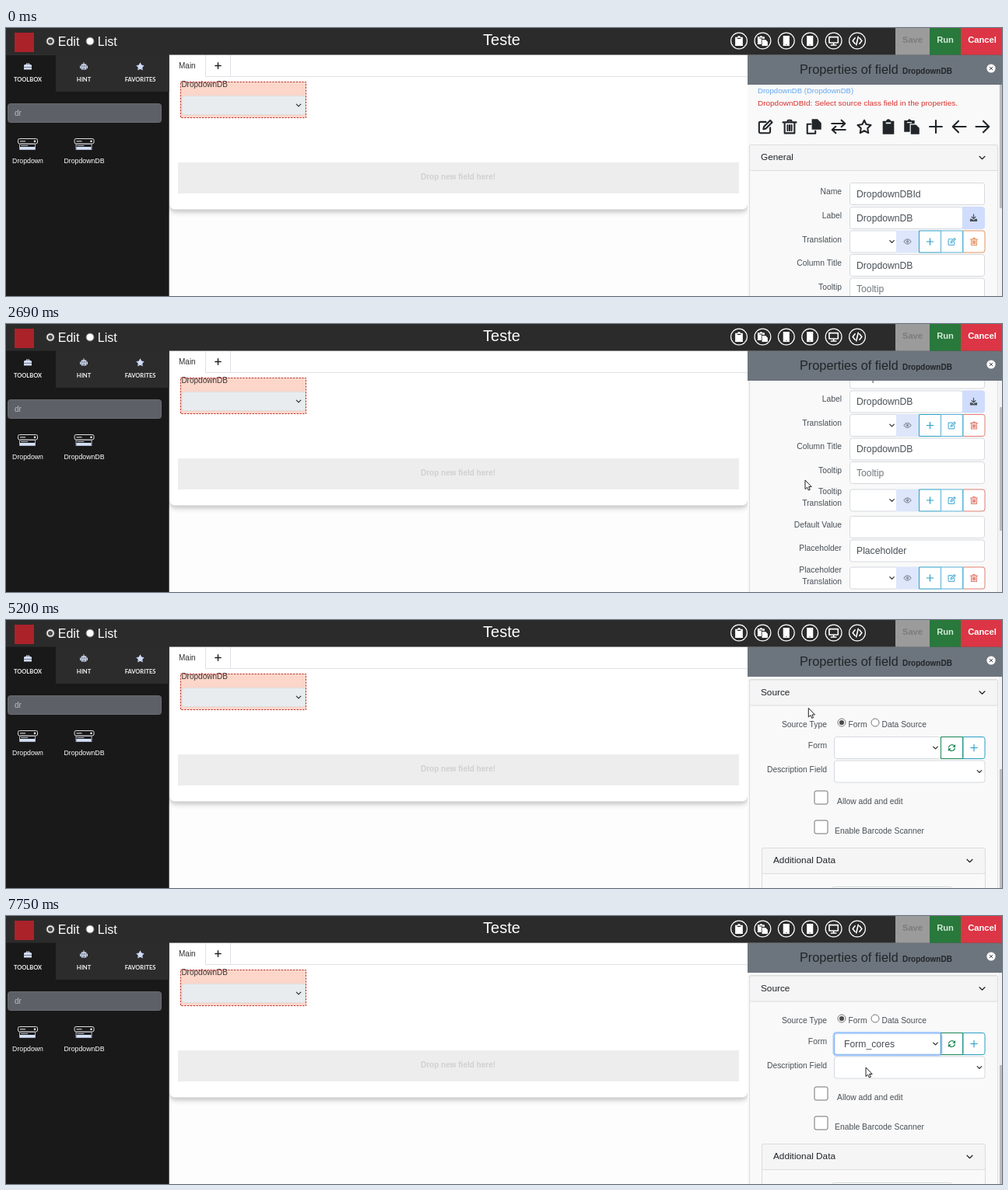
Write an HTML page with a canvas that moves like this. It is 1280x345 px and loops after 8 s.

```html
<!DOCTYPE html>
<html lang="en">
<head>
<meta charset="utf-8">
<style>
html, body { margin: 0; width: 100%; height: 100%; overflow: hidden; background: #fff }
canvas { display: block }
</style>
</head>
<body>
<canvas id="stage" width="1280" height="345"></canvas>
<script>
const ctx = document.getElementById('stage').getContext('2d');
const DARK = '#212529', GREY = '#495057', LINE = '#d5d9de', BLUE = '#2b9fc4';

// Icons on a 16 unit grid: stroked part, filled part
const icons = {
  edit: ['M8.5 3H2.5Q1.3 3 1.3 4.2V13.5Q1.3 14.7 2.5 14.7H11.8Q13 14.7 13 13.5V9M5.8 10.6L6.4 8L13 1.4L15 3.4L8.4 10Z'],
  trash: ['M1 3.4H15M5.3 3.4L6.4 1.2H9.6L10.7 3.4M2.8 3.4V14.9H13.2V3.4M5.9 6.3V12.2M8 6.3V12.2M10.1 6.3V12.2'],
  copy: ['M5 5.3H1.2V15.2H9.8V12.5', 'M6 0H12L16 4V11H6Z'],
  swap: ['M0.8 4.7H14.5M11 1.2L14.8 4.7L11 8.2M15.2 11.3H1.5M5 7.8L1.2 11.3L5 14.8'],
  star: ['M8 1.2L10.1 5.6L15 6.3L11.5 9.7L12.3 14.6L8 12.3L3.7 14.6L4.5 9.7L1 6.3L5.9 5.6Z'],
  clip: ['', 'M2 2H5.2Q8 -2 10.8 2H14V16H2ZM5.3 3.4H10.7V5H5.3Z'],
  paste: ['', 'M0 1.5H3.5Q5.5 -1.5 7.5 1.5H11V5H6V13.5H0ZM3 3H8V4.2H3ZM7 6H12.5L16 9.5V16H7Z'],
  plus: ['M8 1.5V14.5M1.5 8H14.5'],
  left: ['M15 8H1.5M7.2 2L1.2 8L7.2 14'],
  right: ['M1 8H14.5M8.8 2L14.8 8L8.8 14'],
  move: ['M8 1V15M1 8H15M5.8 3L8 1L10.2 3M5.8 13L8 15L10.2 13M3 5.8L1 8L3 10.2M13 5.8L15 8L13 10.2'],
  down: ['M2.5 5.3L8 10.7L13.5 5.3'],
  eye: ['M1 8Q8 -1.5 15 8Q8 17.5 1 8Z', 'M5.3 8A2.7 2.7 0 1 0 10.7 8A2.7 2.7 0 1 0 5.3 8Z'],
  download: ['M8 1V9M4.3 5.8L8 9.5L11.7 5.8', 'M1 10H5L8 12.5L11 10H15V15H1Z'],
  refresh: ['M2 7A6.2 6.2 0 0 1 13 4.5M14 9A6.2 6.2 0 0 1 3 11.5', 'M15 1V6.8H9.2ZM1 15V9.2H6.8Z'],
  toolbox: ['', 'M4.5 4V1.5H11.5V4H14.5L16 6V9H0V6L1.5 4ZM6 3V4H10V3ZM0 10H16V14.5H0Z'],
  robot: ['', 'M7 0H9V3H13.2V14.5H2.8V3H7ZM5 6V8.5H7V6ZM9 6V8.5H11V6ZM5 11V12.5H11V11ZM0 6.5H2V12H0ZM14 6.5H16V12H14Z'],
  device: ['', 'M3 0H13V16H3ZM7.2 13.4V14.6H8.8V13.4Z'],
  monitor: ['M1 2H15V11H1ZM8 11V14.5M4 14.7H12'],
  code: ['M4.5 3.5L0.8 8L4.5 12.5M11.5 3.5L15.2 8L11.5 12.5M9.5 1.5L6.5 14.5'],
  cross: ['M3 3L13 13M13 3L3 13']
};
for (const key in icons) icons[key] = icons[key].map(d => new Path2D(d));
const arrow = new Path2D('M0 0V11.5L2.7 9.2L4.4 13L6.3 12.2L4.6 8.5H8.2Z');

function icon(name, x, y, size, color = DARK, weight = 1.7) {
  const [line, solid] = icons[name];
  ctx.save();
  ctx.translate(x - size / 2, y - size / 2);
  ctx.scale(size / 16, size / 16);
  ctx.strokeStyle = ctx.fillStyle = color;
  ctx.lineWidth = weight;
  ctx.lineJoin = ctx.lineCap = 'round';
  ctx.stroke(line);
  if (solid) ctx.fill(solid, 'evenodd');
  ctx.restore();
}

function text(str, x, y, size, color = GREY, align = 'left', weight = 400, font = '"Liberation Sans", Arial') {
  ctx.font = `${weight} ${size}px ${font}, sans-serif`;
  ctx.fillStyle = color;
  ctx.textAlign = align;
  ctx.fillText(str, x, y);
}

function rect(x, y, w, h, color) {
  ctx.fillStyle = color;
  ctx.fillRect(x, y, w, h);
}

function box(x, y, right, bottom, fill = '#fff', stroke = LINE, radius = 3) {
  ctx.beginPath();
  ctx.roundRect(x + .5, y + .5, right - x - 1, bottom - y - 1, radius);
  ctx.lineWidth = 1;
  if (fill) { ctx.fillStyle = fill; ctx.fill(); }
  if (stroke) { ctx.strokeStyle = stroke; ctx.stroke(); }
}

function disc(x, y, r, fill, stroke, width = 1) {
  ctx.beginPath();
  ctx.arc(x, y, r, 0, 7);
  if (fill) { ctx.fillStyle = fill; ctx.fill(); }
  if (stroke) { ctx.strokeStyle = stroke; ctx.lineWidth = width; ctx.stroke(); }
}

function radio(x, y, on) {
  disc(x, y, 5, '#fff', '#767676');
  if (on) disc(x, y, 3.1, '#4c4c4c');
}

// Value of a list of [time, ...numbers] keys at time t
function at(keys, t, ease = u => u) {
  const i = keys.findIndex(k => k[0] > t);
  if (i < 0) return keys.at(-1).slice(1);
  if (!i) return keys[0].slice(1);
  const a = keys[i - 1], b = keys[i], u = ease((t - a[0]) / (b[0] - a[0]));
  return a.slice(1).map((v, j) => v + (b[j + 1] - v) * u);
}
const smooth = u => u * u * (3 - 2 * u);

const pointerKeys = [
  [190, 1030, 306], [930, 331, 97], [1060, 327, 94], [1260, 327, 94], [2000, 1000, 193], [2210, 1027, 201],
  [4110, 1027, 201], [4480, 1050, 138], [4860, 1009, 95], [4930, 1009, 95], [5680, 1084, 157],
  [6000, 1104, 164], [6450, 1104, 164], [7150, 1100, 188], [7500, 1100, 188], [7550, 1104, 190],
  [7700, 1104, 190], [7750, 1105, 195]
];
const scrollKeys = [
  [2409, 0], [2410, 5], [2560, 70], [3040, 343], [3190, 412], [3260, 418],
  [3640, 418], [3650, 432], [3715, 478], [3780, 504]
];
const OPEN = 5950, PICK = 7750;
const options = ['Form_cores', 'FormularioTeste', 'Role', 'SubscribeTopic', 'Teste', 'Topic', 'User', 'UserRole', 'UserToken'];
const tools = ['edit', 'trash', 'copy', 'swap', 'star', 'clip', 'paste', 'plus', 'left', 'right'];

function topBar() {
  rect(0, 0, 1280, 34.5, '#2b2b2b');
  rect(11, 6, 25, 25, '#ab2229');
  radio(57, 17, true);
  text('Edit', 66.8, 23.4, 16, '#fff');
  radio(108, 17);
  text('List', 117.8, 23.4, 16, '#fff');
  text('Teste', 637, 21.6, 20, '#fff', 'center');
  ['clip', 'paste', 'device', 'device', 'monitor', 'code'].forEach((name, i) => {
    const x = 942 + i * 30.4;
    disc(x, 16.5, 10.4, null, '#fff', 1.2);
    icon(name, x, 16.5, 13, '#fff', 2);
  });
  rect(1143, 0, 44, 34.5, '#9b9b9b');
  rect(1187, 0, 40, 34.5, '#28793b');
  rect(1227, 0, 53, 34.5, '#dc3545');
  text('Save', 1165, 19.4, 11.2, '#7c7c7c', 'center', 700);
  text('Run', 1207, 19.4, 11.2, '#d3ead8', 'center', 700);
  text('Cancel', 1254.5, 19.4, 11.2, '#fff', 'center', 700);
}

function sidebar() {
  rect(0, 34.5, 209.5, 311, '#191919');
  rect(64, 34.5, 145.5, 47.5, '#2c2c2c');
  [['toolbox', 'TOOLBOX', 28], ['robot', 'HINT', 100], ['star', 'FAVORITES', 172.5]].forEach(([name, label, x]) => {
    icon(name, x, 49.5, 10, '#d3defb');
    if (name == 'star') disc(x, 49.7, 2.8, '#d3defb');
    text(label, x, 69, 7.5, '#f1f1f1', 'center', 700, 'Lato');
  });
  box(2, 97, 200, 122, '#5d6167', '#676b70');
  text('dr', 11, 113, 10, '#b9bdc2');
  [['Dropdown', 28], ['DropdownDB', 100.5]].forEach(([label, x]) => {
    box(x - 13, 142, x + 13, 149.5, '#191919', '#dedede', 2);
    rect(x - 10, 145, 7, 1.5, '#aaa');
    disc(x + 9, 145.8, 1.2, '#fff');
    box(x - 11, 149, x + 10, 157, '#191919', '#aeb4c2', 0);
    rect(x - 9, 151, 9, 1, '#bbb');
    rect(x - 10, 153, 19, 3, '#d5dff8');
    text(label, x, 174, 8.75, '#fff', 'center');
  });
}

function editor(hover) {
  rect(209.5, 34.5, 744, 311, '#fdfdfd');
  ctx.save();
  ctx.shadowColor = 'rgba(0,0,0,.26)';
  ctx.shadowBlur = 7;
  ctx.shadowOffsetY = 3;
  ctx.beginPath();
  ctx.roundRect(210, 34.5, 743, 199, [0, 0, 7, 7]);
  ctx.fillStyle = '#fff';
  ctx.fill();
  ctx.restore();
  rect(256, 62, 697, 1, '#dee2e6');
  rect(256, 35, 1, 27, '#dee2e6');
  rect(288, 35, 1, 27, '#dee2e6');
  text('Main', 222, 52, 10, '#333');
  icon('plus', 272.5, 48.5, 9, DARK, 2.6);

  rect(224, 69, 161.5, 46.5, '#fbd6c9');
  text('DropdownDB', 225.4, 76.4, 10, '#3b3535');
  box(226, 87, 385, 112, '#e9ecef', '#dcdfe3');
  icon('down', 376, 99.5, 8, '#333', 2.6);
  ctx.setLineDash([2.3, 1.5]);
  ctx.strokeStyle = '#bb3030';
  ctx.lineWidth = 1;
  ctx.strokeRect(224.5, 69.5, 161, 46);
  ctx.setLineDash([]);

  rect(221, 173, 721, 40, '#ededed');
  text('Drop new field here!', 581, 195, 10, '#d0d0d0', 'center', 700);

  if (hover) {
    ctx.save();
    ctx.beginPath();
    ctx.rect(349, 69, 22, 158);
    ctx.clip();
    rect(349, 69, 22, 158, '#dbf0fd');
    ['move', ...tools.slice(0, 7)].forEach((name, i) => icon(name, 360, 80.2 + i * 21.7, 13));
    ctx.restore();
  }
}

function label(str, right, y) { text(str, right, y + 15, 10.35, GREY, 'right'); }

function input(str, y, color = GREY, right = 1258) {
  box(1084, y, right, y + 29);
  text(str, 1093, y + 18.6, 12.2, color);
}

function select(x, y, right) {
  box(x, y, right, y + 29);
  icon('down', right - 7.5, y + 14.5, 8, '#333', 2.6);
}

// Corners are round only on the last button of a group
function button(name, x, y, color, fill = '#fff', edge = color) {
  const end = x > 1225 ? 3 : 0;
  box(x, y, x + 29, y + 29, fill, edge, [0, end, end, 0]);
  icon(name, x + 14.5, y + 14.5, 10.5, color, 1.8);
}

function translation(y, bin) {
  select(1084, y, 1146);
  button('eye', 1144, y, '#8993a3', '#dde6fa', '#dde6fa');
  button('plus', 1173, y, BLUE);
  button('trash', 1229.5, y, bin);
  button('edit', 1201, y, '#58b2d8');
}

function header(str, x, y, right) {
  box(x, y, right, y + 34, '#f5f5f6', '#dcdcdd', 2);
  text(str, x + 15, y + 20, 11.8, DARK);
  icon('down', right - 20.5, y + 17, 10, DARK, 2);
}

function checkbox(x, y, str, textX) {
  box(x, y, x + 18, y + 18, '#fff', '#6f7276', 2);
  text(str, textX, y + 17, 10.35);
}

function properties(scroll, focused, picked) {
  rect(953, 34.5, 327, 311, '#f9f9f9');
  ctx.save();
  ctx.beginPath();
  ctx.rect(953, 73, 323, 272);
  ctx.clip();
  ctx.translate(0, -scroll);

  text('DropdownDB (DropdownDB)', 966, 84, 9.6, '#64a8f3');
  text('DropdownDBId: Select source class field in the properties.', 966, 100, 9.97, '#d8312f');
  [976, 1007, 1038, 1070, 1103, 1134, 1164, 1195, 1225, 1255].forEach((x, i) => icon(tools[i], x, 127, 19.5));

  const bin = scroll ? '#e27d70' : '#e8925f';
  box(955, 150, 1275, 575, '#f9f9f9', '#dcdcdd', 2);
  header('General', 955, 150, 1275);
  label('Name', 1074, 199);
  input('DropdownDBId', 199);
  label('Label', 1074, 230);
  input('DropdownDB', 230, GREY, 1230);
  button('download', 1229, 230, GREY, '#cfdcfb', '#cfdcfb');
  label('Translation', 1074, 260.5);
  translation(260.5, bin);
  label('Column Title', 1074, 291);
  input('DropdownDB', 291);
  label('Tooltip', 1074, 321.5);
  input('Tooltip', 321.5, '#70777d');
  label('Tooltip', 1074, 349);
  label('Translation', 1074, 364);
  translation(357, bin);
  label('Default Value', 1074, 391.5);
  input('', 391.5);
  label('Placeholder', 1074, 422);
  input('Placeholder', 422);
  label('Placeholder', 1074, 449.5);
  label('Translation', 1074, 464.5);
  translation(457, bin);
  label('Session Variable', 1074, 491.5);
  select(1084, 491.5, 1258);
  checkbox(970.5, 531, 'Unique', 1000);

  box(955, 580, 1275, 1000, '#f9f9f9', '#dcdcdd', 2);
  header('Source', 955, 580.5, 1275);
  label('Source Type', 1055, 627);
  radio(1074, 636, true);
  text('Form', 1082.5, 642, 10.35);
  radio(1117, 636);
  text('Data Source', 1125.5, 642, 10.35);
  label('Form', 1055, 654);
  select(1064, 654, 1202);
  button('refresh', 1201, 654, '#198754');
  button('plus', 1229.5, 654, BLUE);
  if (focused) {
    ctx.beginPath();
    ctx.roundRect(1064, 654.5, 138, 28.5, 3);
    ctx.strokeStyle = 'rgba(13,110,253,.22)';
    ctx.lineWidth = 3.4;
    ctx.stroke();
    ctx.strokeStyle = '#86b7fe';
    ctx.lineWidth = 1;
    ctx.stroke();
  }
  if (picked) text('Form_cores', 1077, 673, 12.2);
  label('Description Field', 1055, 684.5);
  select(1064, 684.5, 1258.5);
  checkbox(1038.5, 723.5, 'Allow add and edit', 1068);
  checkbox(1038.5, 761.5, 'Enable Barcode Scanner', 1065);
  box(971, 797, 1259, 1000, '#f9f9f9', '#dcdcdd', 2);
  header('Additional Data', 971, 797, 1259);
  box(1061, 847, 1217, 876);
  ctx.restore();

  rect(1276, 73, 4, 272, '#f0f0f0');
  rect(1277, 73 + scroll * .236, 3, 159, '#bcbcbc');
  rect(953, 34.5, 327, 38.5, '#6c757d');
  text('Properties of field', 1020, 59, 16.3, DARK);
  text('DropdownDB', 1152, 59, 10, DARK, 'left', 700);
  disc(1266, 52, 5.6, '#fff');
  icon('cross', 1266, 52, 6, '#444', 2.5);
}

function optionList(alpha, hover) {
  ctx.save();
  ctx.globalAlpha = alpha;
  ctx.shadowColor = 'rgba(0,0,0,.34)';
  ctx.shadowBlur = 36;
  ctx.shadowOffsetY = 10;
  box(1065, 182, 1201.5, 305.5, '#fff', null, 5);
  ctx.shadowColor = 'transparent';
  box(1065, 182, 1201.5, 305.5, null, '#b9bcc0', 5);
  if (hover) rect(1066, 194, 135, 13, '#eceef0');
  options.forEach((name, i) => text(name, 1078, 203.7 + i * 12.27, 9.65));
  ctx.restore();
}

function draw(t) {
  const [px, py] = at(pointerKeys, t, smooth);
  const shown = t >= 190;
  editor(shown && px < 386 && py < 116);
  properties(at(scrollKeys, t)[0], t >= OPEN, t >= PICK);
  sidebar();
  topBar();
  if (t >= OPEN && t < PICK) optionList(Math.min(1, (t - OPEN) / 130), py > 182);
  if (shown) {
    ctx.save();
    ctx.translate(px, py);
    ctx.fillStyle = '#fff';
    ctx.strokeStyle = '#222';
    ctx.lineWidth = 1;
    ctx.fill(arrow);
    ctx.stroke(arrow);
    ctx.restore();
  }
}

function frame() {
  draw(performance.now() % 8000);
  requestAnimationFrame(frame);
}
frame();
</script>
</body>
</html>
```
